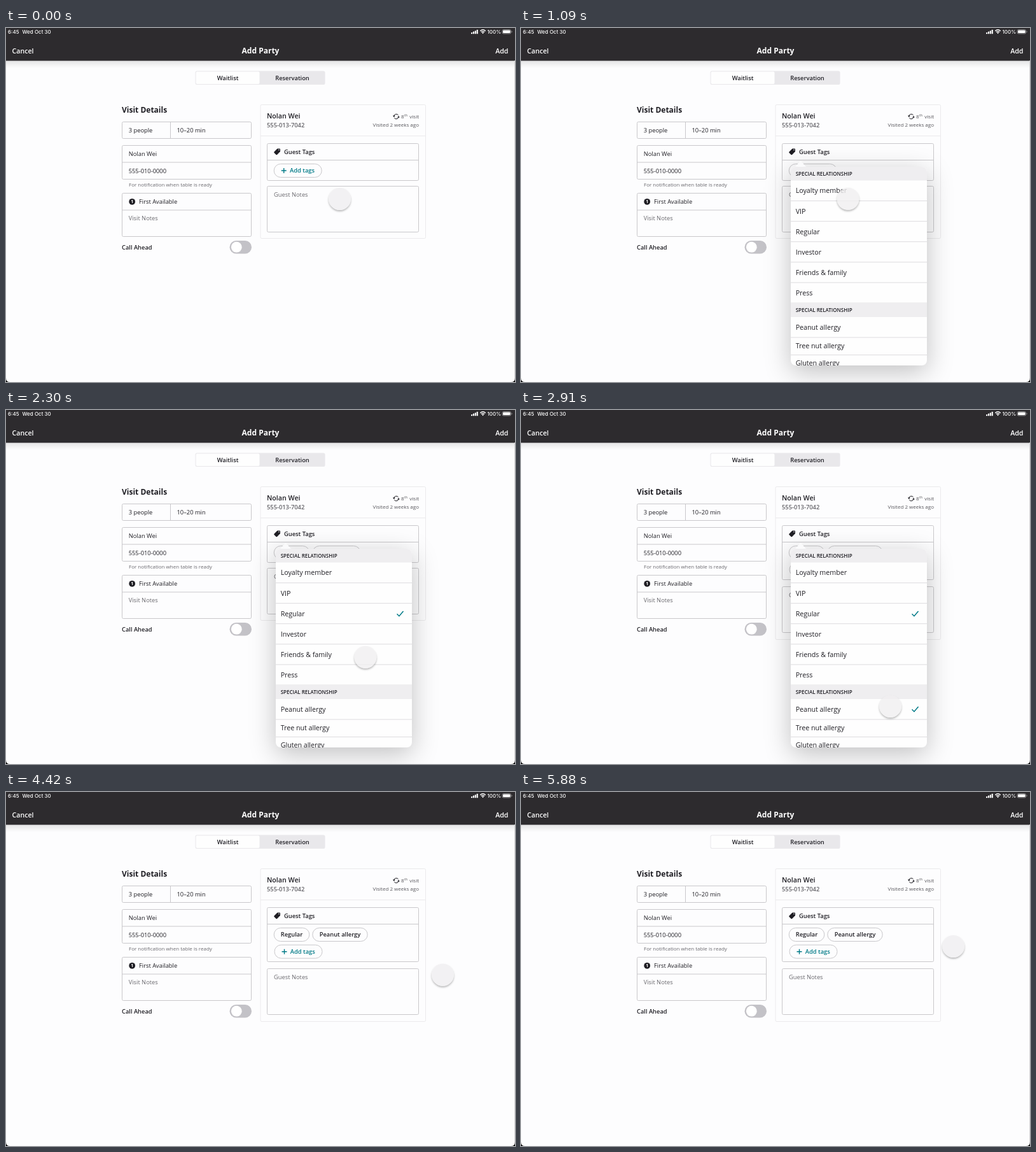
An HTML page for the animation above (5910 ms loop, 800 px wide and 556 px high).

```html
<!DOCTYPE html>
<html lang="en">
<head>
<meta charset="utf-8">
<title>Add Party</title>
<style>
html, body { margin: 0; width: 100%; height: 100%; overflow: hidden; background: #fdfdfe; }
svg { position: absolute; left: 0; top: 0; font-family: "Open Sans", sans-serif; }
#popover { filter: drop-shadow(0 10px 20px rgba(0, 0, 0, .24)); }
#cursor {
  position: absolute; left: -17.5px; top: -17.5px; width: 35px; height: 35px; border-radius: 50%;
  background: rgba(240, 239, 240, .8); box-shadow: 0 2px 3px rgba(0, 0, 0, .27);
}
</style>
</head>
<body>
<svg width="800" height="556" viewBox="0 0 800 556">
  <defs>
    <linearGradient id="fade" x2="0" y2="1">
      <stop stop-color="#000" stop-opacity=".1"/><stop offset="1" stop-color="#000" stop-opacity="0"/>
    </linearGradient>
    <clipPath id="sheet"><rect x="424" y="218" width="214" height="312" rx="8"/></clipPath>
  </defs>
  <g id="page"></g>
  <g id="guest"></g>
  <g id="popover"></g>
</svg>
<div id="cursor"></div>
<script>
const LOOP = 5910;
const OPEN = 550, FIRST_TAG = 1700, SECOND_TAG = 2910, CLOSE = 3940;
const INK = '#1f1e24', GREY = '#6a696e', TEAL = '#007a87', BORDER = '#c9c8cb';
const GUEST = 'Nolan Wei';
const $ = id => document.getElementById(id);

// y is the middle of the capital letters
const text = (x, y, str, { size = 9.33, weight = 400, fill = INK, anchor = 'start', extra = '' } = {}) =>
  `<text x="${x}" y="${y + size * .357}" font-size="${size}" font-weight="${weight}" fill="${fill}" text-anchor="${anchor}" ${extra}>${str}</text>`;
const rect = (x, y, x2, y2, fill, r = 0, stroke = 'none') =>
  `<rect x="${x}" y="${y}" width="${x2 - x}" height="${y2 - y}" rx="${r}" fill="${fill}" stroke="${stroke}"/>`;
const box = (x, y, x2, y2, stroke = BORDER) => rect(x + .5, y + .5, x2 - .5, y2 - .5, '#fdfdfe', 2, stroke);
const line = (x, y, x2, y2, stroke = BORDER) => `<path d="M${x} ${y}L${x2} ${y2}" stroke="${stroke}"/>`;
const path = (d, stroke, width) => `<path d="${d}" fill="none" stroke="${stroke}" stroke-width="${width}"/>`;
const bold = { weight: 600 };

function drawPage() {
  const inter = { size: 8, weight: 500, fill: '#fff', extra: 'font-family="Inter, sans-serif"' };
  const bar = { size: 10.67, weight: 600, fill: '#fff' };
  const bars = [0, 1, 2, 3].map(i => rect(731 + i * 2.9, 7 - i * 1.4, 733.1 + i * 2.9, 9.2, '#fff', .5)).join('');
  return rect(0, 51, 800, 63, 'url(#fade)') + rect(0, 0, 800, 51.5, '#2d2b2e') +
    text(3, 6, '6:45', inter) + text(25.5, 6, 'Wed Oct 30', inter) + bars +
    path('M745.2 4.7Q749.5.9 753.8 4.7M746.9 6.5Q749.5 4.3 752.1 6.5', '#fff', 1.4) +
    '<path d="M747.9 7.6Q749.5 6.4 751.1 7.6L749.5 9.3Z" fill="#fff"/>' +
    text(756.5, 6, '100%', inter) +
    rect(780, 2.6, 793.6, 9, 'none', 2, '#8b8a8c') + rect(781, 3.6, 792.6, 8, '#fff', 1.2) + rect(794.6, 4.6, 795.5, 7, '#8b8a8c') +
    text(9.5, 36, 'Cancel', bar) + text(789.5, 36, 'Add', { ...bar, anchor: 'end' }) +
    text(400, 35.8, 'Add Party', { size: 12, weight: 700, fill: '#fff', anchor: 'middle' }) +
    rect(297.5, 67.5, 501.5, 89, '#e9e8eb', 2.5) + rect(298.5, 68.5, 398.5, 88, '#fefefe', 2) +
    text(348.5, 78.3, 'Waitlist', { ...bold, anchor: 'middle' }) +
    text(450, 78.3, 'Reservation', { ...bold, anchor: 'middle' }) +
    text(182, 128.3, 'Visit Details', { size: 12, weight: 700 }) +
    box(182, 147, 386, 174) + line(258.5, 147, 258.5, 174) +
    text(192.7, 160.3, '3 people') + text(268.5, 160.3, '10–20 min') +
    box(182, 184, 386, 238) + line(182, 211, 386, 211) +
    text(192.7, 197.8, GUEST) + text(192.7, 224.6, '555-010-0000') +
    text(193, 245.8, 'For notification when table is ready', { size: 8, fill: GREY }) +
    box(182, 259, 386, 328) + line(182, 286, 386, 286) +
    `<circle cx="198.2" cy="272.8" r="4.9" fill="${INK}"/>` +
    text(198.2, 272.8, '1', { size: 7, weight: 700, fill: '#fff', anchor: 'middle' }) +
    text(209, 272.8, 'First Available') + text(192.7, 299, 'Visit Notes', { fill: GREY }) +
    text(182, 344.4, 'Call Ahead', bold) +
    rect(351.5, 334, 386, 354.5, '#c3c2c7', 10.2) + '<circle cx="362.3" cy="344.2" r="8.4" fill="#fff"/>' +
    rect(799, 51, 800, 556, '#d8d7d9') +
    '<path d="M0 550Q0 556 6 556H0ZM800 550Q800 556 794 556H800Z" fill="#000"/>';
}

const pill = (x, y, x2) => rect(x + .5, y - 10.5, x2 - .5, y + 10.5, '#fdfdfe', 10.5, BORDER);
const tag = (x, y, x2, label) => pill(x, y, x2) + text((x + x2) / 2, y, label, { ...bold, anchor: 'middle' });
const addTags = (x, y) => pill(x, y, x + 76) +
  path(`M${x + 12} ${y}h8m-4 -4v8`, TEAL, 1.4) + text(x + 25.3, y, 'Add tags', { ...bold, fill: TEAL });

function drawGuest(tags) {
  const tall = tags === 2, notes = tall ? 277 : 248;
  const small = { size: 8, fill: '#58575c', anchor: 'end' };
  return box(399.5, 120, 660, tall ? 361 : 331, '#ebeaec') + line(400, 169.5, 659, 169.5, '#ebeaec') +
    text(410, 138.3, GUEST, { size: 10.67, weight: 600 }) +
    text(410, 152.5, '555-013-7042', { ...bold, fill: '#626166' }) +
    path('M609.8 138.3A3.7 3.7 0 0 1 616.6 137M617 139.8A3.7 3.7 0 0 1 610.2 141.1', INK, 1) +
    `<path d="M607.9 137.6h3.8l-1.9 2.6zM615.1 140.5h3.8l-1.9-2.6z" fill="${INK}"/>` +
    text(621, 139.3, '8', { size: 8, fill: '#58575c' }) + text(625.8, 136.8, 'th', { size: 5.3, fill: '#58575c' }) +
    text(649, 139.3, 'visit', small) + text(649, 151.8, 'Visited 2 weeks ago', small) +
    box(410, 181, 649, tall ? 267 : 240) + line(410, 207.5, 649, 207.5) +
    `<path d="M426.4 189.4h3.6q1 0 1 1v3.6l-5 5q-.8.6-1.5 0l-3-3q-.7-.8 0-1.5z" fill="${INK}"/><circle cx="429" cy="191.5" r=".8" fill="#fff"/>` +
    text(437, 194.3, 'Guest Tags', bold) +
    (tags ? tag(420.7, 224, 477.3, 'Regular') : addTags(420.7, 224)) +
    (tags === 1 ? addTags(481.5, 224) : '') +
    (tall ? tag(481.3, 224, 568.7, 'Peanut allergy') + addTags(421.5, 250.7) : '') +
    box(410, notes, 649, notes + 73) + text(421, notes + 13.7, 'Guest Notes', { fill: GREY });
}

function drawPopover(tags) {
  const head = (y, y2) => rect(424, y, 638, y2, '#efeef0') +
    text(431.7, (y + y2) / 2 + .2, 'SPECIAL RELATIONSHIP', { size: 8, weight: 600 });
  const row = (y, label, under) => text(431.7, y, label, { size: 10.67 }) +
    (under ? line(424, under, 638, under, '#dddcdf') : '');
  const check = y => path(`M614.5 ${y + .3}l3.4 3.4 6.6 -7.6`, TEAL, 1.5);
  const people = ['Loyalty member', 'VIP', 'Regular', 'Investor', 'Friends &amp; family', 'Press'];
  return '<path d="M429 219Q432 218 434.5 214L438 210Q439.5 208.600 441 210L444.500 214Q447 218 450 219Z" fill="#fafafb"/>' +
    '<g clip-path="url(#sheet)">' + rect(424, 218, 638, 530, '#fefefe') + head(218, 239.5) +
    people.map((name, i) => row(255.6 + i * 32.2, name, 271.5 + i * 32.1)).join('') +
    head(432, 454) + row(470, 'Peanut allergy', 486) + row(499.5, 'Tree nut allergy', 513.5) + row(526.5, 'Gluten allergy') +
    (tags > 0 ? check(320) : '') + (tags > 1 ? check(470) : '') + '</g>';
}

// start, end, target x, target y, sideways bow
const start = [524, 268];
const moves = [
  [30, 330, 481, 229, -5],
  [850, 1360, 526, 314, 12],
  [2030, 2580, 580, 465, 12],
  [3150, 3580, 688, 332, 5],
  [4170, 4670, 679, 242, 2.5]
];

function cursorAt(t) {
  let [x, y] = start;
  for (const [from, to, x2, y2, bow] of moves) {
    const p = Math.min(1, Math.max(0, (t - from) / (to - from)));
    const e = .5 - .5 * Math.cos(Math.PI * p);
    x += (x2 - x) * e + bow * 4 * e * (1 - e);
    y += (y2 - y) * e;
    if (p < 1) break;
  }
  return [x, y];
}

let shown = -1;
function frame(now) {
  const t = now % LOOP;
  const tags = (t >= FIRST_TAG) + (t >= SECOND_TAG);
  if (tags !== shown) {
    $('guest').innerHTML = drawGuest(tags);
    $('popover').innerHTML = drawPopover(tags);
    shown = tags;
  }
  $('popover').style.display = t >= OPEN && t < CLOSE ? '' : 'none';
  const [x, y] = cursorAt(t);
  $('cursor').style.transform = `translate(${x}px, ${y}px)`;
  requestAnimationFrame(frame);
}

$('page').innerHTML = drawPage();
const begin = performance.now();
const tick = () => frame(performance.now() - begin);
frame = (draw => () => draw(performance.now() - begin))(frame);
tick();
</script>
</body>
</html>
```
